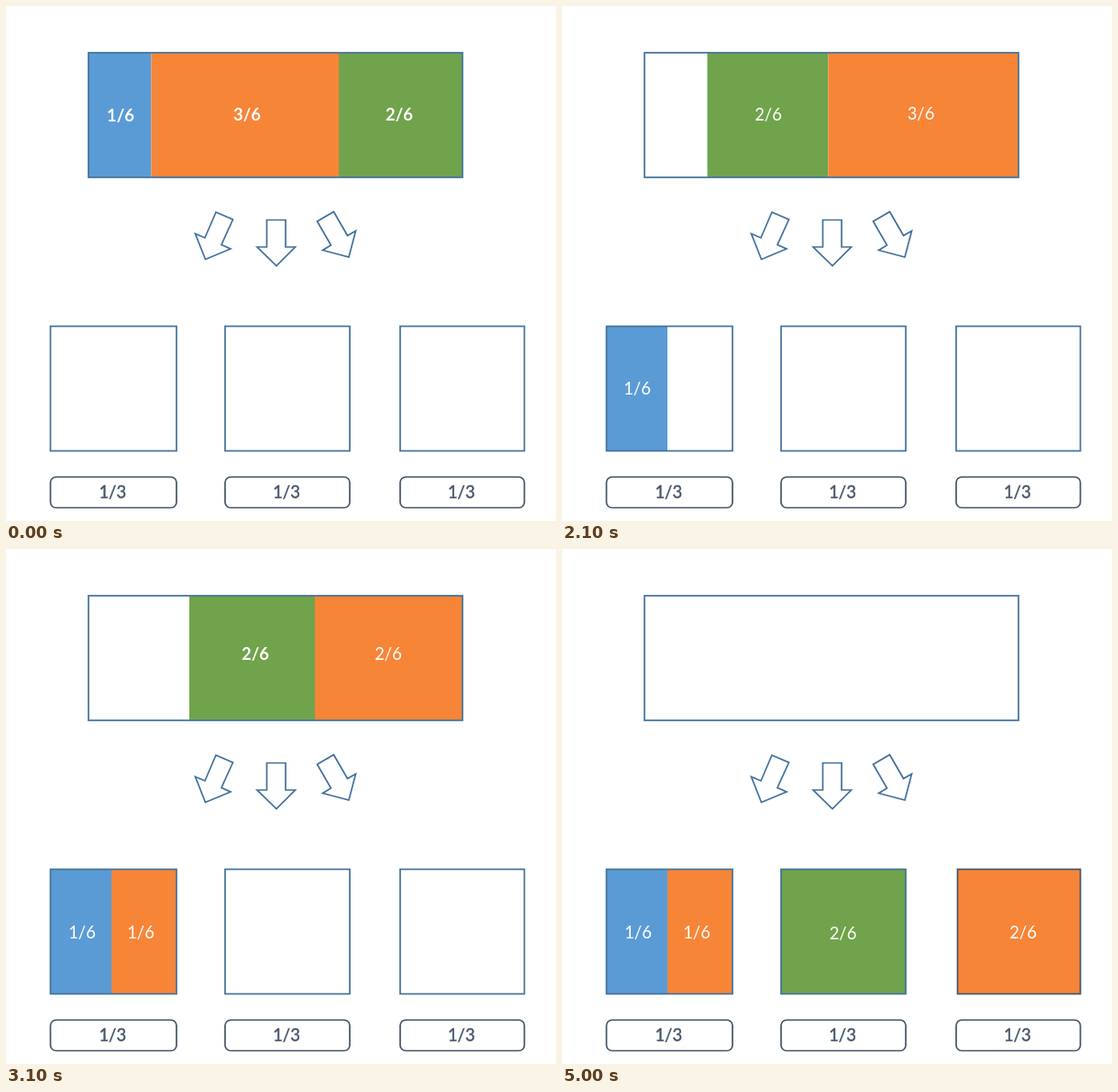
Recreate the animation shown at these times as an HTML page. Size 600 by 562 pixels, loop 5100 ms.

```html
<!DOCTYPE html>
<html lang="en">
<head>
<meta charset="utf-8">
<title>Sharing sixths into thirds</title>
<style>
html, body { margin: 0; width: 100%; height: 100%; overflow: hidden; background: #fff; }
svg { display: block; width: 600px; height: 562px; }
text { font: 18.4px Lato, Carlito, sans-serif; text-anchor: middle; fill: #fff; }
.bold { font-weight: 700; }
.tag { fill: #44546a; stroke: #44546a; stroke-width: .4px; }
.line { fill: none; stroke: #41719c; stroke-width: 1.7px; }
.dark { stroke: #44546a; }
</style>
</head>
<body>
<svg viewBox="0 0 600 562">
  <g id="blocks"></g>
  <g id="outlines"></g>
</svg>
<script>
const LOOP = 5100, TOP = 51, BOTTOM = 349.5, SIDE = 136;
const BLUE = '#5b9bd5', ORANGE = '#f78538', GREEN = '#70a34c';

const box = (x, y, w, h, attrs) =>
  `<rect x="${x}" y="${y}" width="${w}" height="${h}" ${attrs}/>`;
const label = (text, x, y, style = '') =>
  `<text x="${x}" y="${y + 6.6}" class="${style}">${text}</text>`;
const block = (y, left, right, color, text, x, textY, style) =>
  box(left, y, right - left, SIDE, `fill="${color}"`) + label(text, x, textY, style);
const upper = (...args) => block(TOP, ...args);
const lower = (...args) => block(BOTTOM, ...args);

const sixth = upper(90, 158.5, BLUE, '1/6', 125, 119, 'bold');
const middle = style => upper(158.5, 290.5, GREEN, '2/6', 225, 118, style);
const right = style => upper(290.5, 498, ORANGE, '3/6', 391.5, 117, style);
const rest = upper(337, 498, ORANGE, '2/6', 417, 114);
const firstThird = lower(48.5, 115, BLUE, '1/6', 83, 418) +
  lower(115, 186, ORANGE, '1/6', 147, 418.5);
const secondThird = lower(239, 375, GREEN, '2/6', 306.5, 419);
const lastThird = lower(431.5, 565.5, ORANGE, '2/6', 503, 418.5) +
  box(431.5, BOTTOM, 134, SIDE, 'class="line dark"');

const steps = [
  [0, sixth + upper(158.5, 363, ORANGE, '3/6', 263, 118, 'bold') +
    upper(363, 498, GREEN, '2/6', 429, 118, 'bold')],
  [400, sixth + middle('bold') + right('bold')],
  [1100, middle() + right() + lower(48.5, 115, BLUE, '1/6', 82, 417.5)],
  [2400, upper(200, 337, GREEN, '2/6', 272, 114, 'bold') + rest + firstThird],
  [3400, rest + firstThird + secondThird],
  [4100, firstThird + secondThird + lastThird],
];

const arrows = [
  '229,225 247.5,233 235,260.5 245,265 217.5,276.5 206.5,248.5 217,253',
  '284.5,233.5 305,233.5 305,263 315.5,263 295,283.5 274,263 284.5,263',
  '339.5,235 357.5,224.5 372.5,250.5 381.5,245.5 374,274 345.5,266.5 354.5,261',
];
const thirds = [[48.5, 137.5], [239, 136], [430, 135.5]];
const frames = last => box(90, TOP, 408, SIDE, 'class="line"') +
  arrows.map(points => `<polygon points="${points}" class="line"/>`).join('') +
  thirds.map(([x, w], i) =>
    (last && i === 2 ? '' : box(x, BOTTOM, w, SIDE, 'class="line"')) +
    box(x, 514, w, 33.5, 'rx="6" class="line dark"') +
    label('1/3', x + w / 2 - 1, 530.5, 'tag')).join('');

const blocks = document.getElementById('blocks');
const outlines = document.getElementById('outlines');
let shown;

function draw(now) {
  const time = now % LOOP;
  const step = steps.filter(([start]) => start <= time).pop();
  if (step !== shown) {
    shown = step;
    blocks.innerHTML = step[1];
    outlines.innerHTML = frames(step === steps[steps.length - 1]);
  }
  requestAnimationFrame(draw);
}
draw(0);
</script>
</body>
</html>
```
